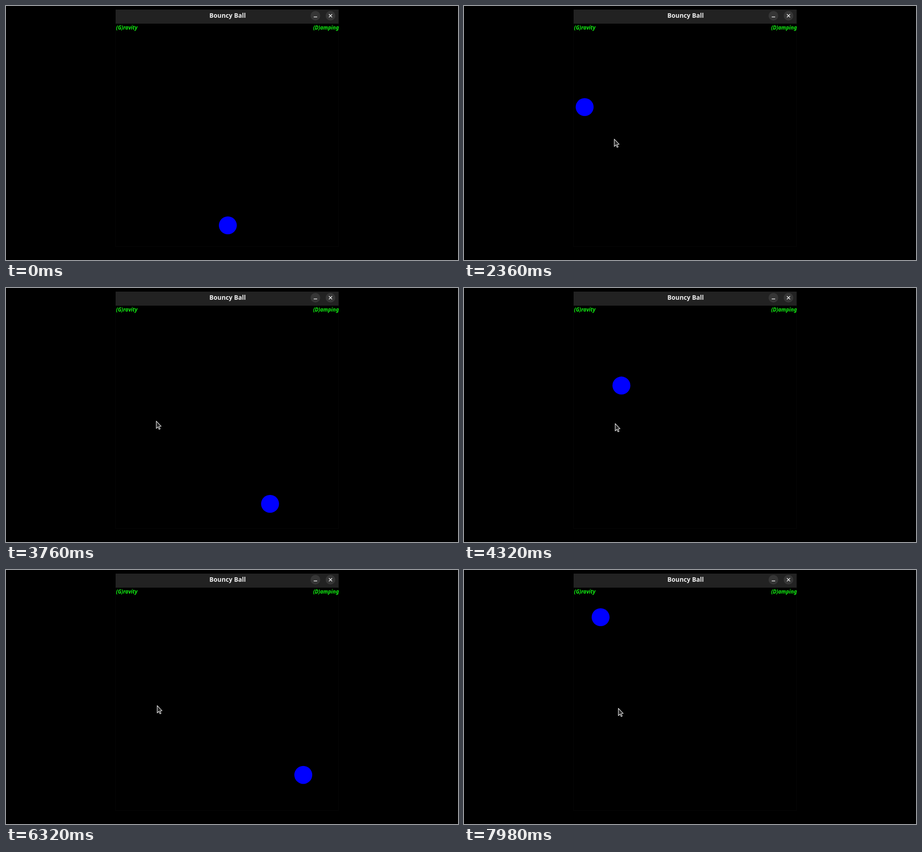
Recreate the animation shown at these times as an HTML page. Size 998 px wide and 561 px high, loop 8000 ms.

```html
<!DOCTYPE html>
<html lang="en">
<head>
<meta charset="utf-8">
<title>Bouncy Ball</title>
<style>
  html, body { margin: 0; width: 100%; height: 100%; overflow: hidden; background: #000; }
  svg { display: block; width: 100vw; height: 100vh; }
  text { font-family: "Noto Sans", "Open Sans", sans-serif; font-weight: 700; }
  .title { font-size: 13.8px; fill: #eee; text-anchor: middle; }
  .label { font-size: 11.5px; font-style: italic; fill: #12f012; }
  .glyph { stroke: #eee; stroke-width: 1.5; fill: none; }
</style>
</head>
<body>
<svg viewBox="0 0 998 561">
  <rect width="998" height="561"/>
  <path d="M241.5 39V531.5H734.5V39" fill="none" stroke="#060606"/>
  <rect x="242" y="8" width="492.5" height="31" fill="#222"/>
  <text class="title" x="489.3" y="26.2">Bouncy Ball</text>
  <g fill="#363636">
    <circle cx="683.2" cy="21.5" r="10.6"/>
    <circle cx="716.5" cy="21.5" r="10.6"/>
  </g>
  <path class="glyph" d="M679.5 24.2H687M713 18L720 25M720 18L713 25"/>
  <text class="label" x="243" y="52">(G)ravity</text>
  <text class="label" x="735" y="52" text-anchor="end">(D)amping</text>
  <circle id="ball" r="19.8" fill="#00f"/>
  <path id="cursor" d="M.8 1V17.2L4.6 13.8L7 19.2L9.4 18.2L7.1 12.8L11.6 12.4Z"
        fill="#2b2b2b" stroke="#d8d8d8" stroke-width="1.3" stroke-linejoin="round"/>
</svg>
<script>
const LOOP = 8000;
const CURSOR_IN = 15, GRAB = 27, PULL = 37, RELEASE = 42, REST = 48, DAMPING_ON = 93;
const ball = document.getElementById('ball');
const cursor = document.getElementById('cursor');

// Launch point and velocity per axis, walls, and speed kept at each damped bounce
const axisX = { from: 431.2, v: -19.62, lo: 260.5, hi: 719, keep: [.7, .738] };
const axisY = { from: 419.2, v: -21.78, lo: 59, hi: 512.5, keep: [.676, .676] };

const ramp = (n, a, b) => Math.min(1, Math.max(0, (n - a) / (b - a)));
const mix = (a, b, u) => a + (b - a) * u;
const easeOut = u => 1 - (1 - u) * (1 - u);
const smooth = u => u * u * (3 - 2 * u);

// Free flight at constant speed, reflected at the walls
function fly({ from, v, lo, hi, keep }, n) {
  let pos = from, t = RELEASE, damped = 0;
  for (;;) {
    const wall = v < 0 ? lo : hi;
    const hit = t + (wall - pos) / v;
    if (n <= hit) return pos + v * (n - t);
    v *= hit > DAMPING_ON ? -keep[damped++ % keep.length] : -1;
    pos = wall;
    t = hit;
  }
}

function ballAt(n) {
  if (n >= RELEASE) return [fly(axisX, n), fly(axisY, n)];
  const pull = ramp(n, PULL, RELEASE) ** 2;
  const y = mix(484.5, 459.5, ramp(n, 1, GRAB));
  return [mix(489.8, axisX.from, pull), mix(y, axisY.from, pull)];
}

// Moves in, carries the ball, lets go and glides to rest, then drifts a little
function cursorAt(n) {
  const [x, y] = ballAt(Math.min(n, RELEASE));
  const enter = 1 - easeOut(ramp(n, CURSOR_IN, GRAB - 1));
  const glide = easeOut(ramp(n, RELEASE, REST));
  const nudge = smooth(ramp(n, 84, 90)), drift = smooth(ramp(n, 150, 166));
  return [
    mix(x - 5 + 23 * enter, 331, glide) + 2 * nudge + 7 * drift,
    mix(y + 8.5 + 60 * enter, 293, glide) + 5.5 * nudge + 6 * drift
  ];
}

function stepAt(ms) {
  const t = ms + 20, r = t % 140;
  return 3 * Math.floor(t / 140) + (r < 20 ? 0 : r < 40 ? 1 : 2);
}

function draw(ms) {
  const n = stepAt(ms);
  ball.setAttribute('transform', `translate(${ballAt(n)})`);
  cursor.setAttribute('transform', `translate(${cursorAt(n)})`);
  cursor.setAttribute('visibility', n < CURSOR_IN ? 'hidden' : 'visible');
}

const start = performance.now();
function tick() {
  draw((performance.now() - start) % LOOP);
  requestAnimationFrame(tick);
}
tick();
</script>
</body>
</html>
```
